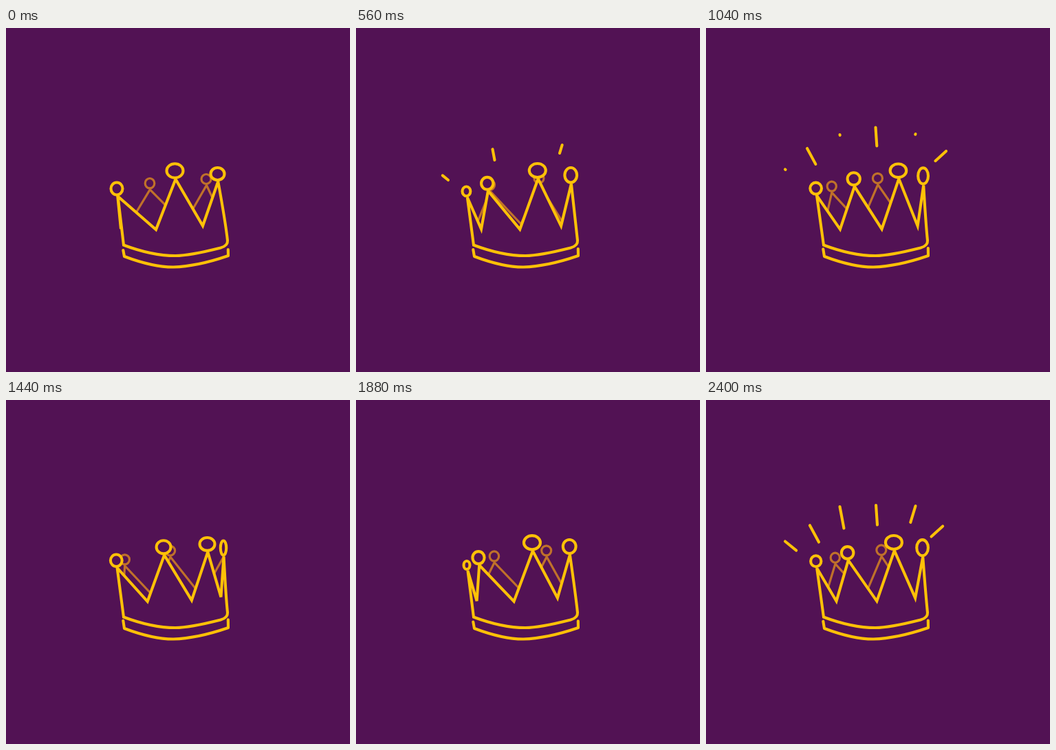
Write an HTML page with a canvas that moves like this. It is 500 by 500 pixels and loops after 2.44 s.

```html
<!DOCTYPE html>
<html lang="en">
<head>
<meta charset="utf-8">
<title>Crown</title>
<style>
html, body { margin: 0; width: 100%; height: 100%; overflow: hidden; background: #521254; }
canvas { display: block; width: 100%; height: 100%; }
</style>
</head>
<body>
<canvas id="stage" width="500" height="500"></canvas>
<script>
const ctx = document.getElementById('stage').getContext('2d');
const BG = '#521254', GOLD = '#ffc107', BRONZE = '#c0712a';
const LOOP = 2440, CUT = 1560, TURN = 1900, STEP = 40;

// Six balls share one closed path round the crown: place, x, y, rx, ry.
// Places 0 to 4 are the front, 4 to 6 the rear.
const ballPath = [
  [0, 161, 236, .5, 6], [.17, 161, 240, 4.5, 6], [.5, 159.5, 233, 8.3, 8.4], [1, 161, 233.5, 8.5, 9],
  [1.5, 211.5, 220.5, 8.8, 8.9], [2, 245.5, 207.5, 12, 10.2], [2.5, 276.5, 206.8, 12, 9.9],
  [3, 307.5, 212, 10, 9], [3.5, 315.5, 215, 8.1, 11.9], [3.76, 316, 215, 4.2, 10.5],
  [4, 291, 219.5, 7, 7], [4.4, 257, 218, 7, 7.2], [4.76, 238.5, 219, 7, 7],
  [5, 209, 225.7, 6.8, 7.2], [5.5, 185, 229.7, 6.6, 7], [6, 161, 234, 7, 7]
];

// The valleys between them follow their own path: place, x, y
const valleyPath = [
  [0, 167, 292], [1, 218, 293], [1.7, 266, 292], [2, 286, 287.5], [2.5, 306.5, 288],
  [3, 318, 285], [3.5, 291, 285], [3.76, 284, 285], [4, 259, 285], [4.4, 233, 285],
  [4.76, 214, 285], [5, 179, 285], [6, 167, 285]
];

// Inner and outer ends of the rays
const rays = [
  [134, 221, 115, 205.5], [164, 206.5, 147, 175], [201.5, 192, 194.5, 155],
  [249, 181.5, 246.5, 144.5], [296, 182, 304.5, 154], [327.5, 198.5, 349, 179]
];

const mix = (a, b, k) => a + (b - a) * k;
const clamp = v => Math.min(1, Math.max(0, v));

function along(path, place) {
  const i = path.findIndex(key => key[0] > place);
  const a = path[i - 1], b = path[i];
  const k = (place - a[0]) / (b[0] - a[0]);
  return a.slice(1).map((v, j) => mix(v, b[j + 1], k));
}

const valley = place => along(valleyPath, place);

function tip(place) {
  const [x, y, , ry] = along(ballPath, place);
  return [x + 1.5 - place / 4, y + ry + 2];
}

function pen(color, width) {
  ctx.strokeStyle = color;
  ctx.lineWidth = width;
  ctx.lineCap = 'round';
  ctx.lineJoin = 'miter';
  ctx.miterLimit = 5;
}

function line(points) {
  ctx.beginPath();
  points.forEach(p => ctx.lineTo(...p));
  ctx.stroke();
}

function ball(place) {
  ctx.beginPath();
  ctx.ellipse(...along(ballPath, place), 0, 0, Math.PI * 2);
  ctx.fill();
  ctx.stroke();
}

function drawRear(u) {
  pen(BRONZE, 3.2);
  const zigzag = [valley(3 + u), tip(4 + u), valley(4 + u), tip(5 + u), valley(5 + u)];
  // The right front point joins in as it turns away
  if (u > .6) zigzag.unshift(tip(3 + u));
  line(zigzag);
  ball(5 + u);
  ball(4 + u);
}

function drawFront(u) {
  pen(GOLD, 4.1);
  ctx.beginPath();
  ctx.moveTo(171, 315.5);
  for (let i = 0; i < 4; i++) {
    ctx.lineTo(...tip(i + u));
    if (i < 3) ctx.lineTo(...valley(i + u));
  }
  ctx.quadraticCurveTo(319.5, 285, 322, 309);
  ctx.quadraticCurveTo(322.5, 316.5, 312, 319.5);
  ctx.quadraticCurveTo(267, 331, 246, 331);
  ctx.quadraticCurveTo(212, 331, 171, 315.5);
  ctx.closePath();
  ctx.fill();
  ctx.stroke();
  for (let i = 0; i < 4; i++) ball(i + u);
}

function drawBand(u) {
  pen(GOLD, 4.1);
  ctx.lineJoin = 'round';
  ctx.beginPath();
  ctx.moveTo(170.3, 323 - 3 * u);
  ctx.lineTo(172, 332);
  ctx.quadraticCurveTo(213, 347.5, 243, 347.5);
  ctx.quadraticCurveTo(278, 346.5, 323, 331);
  ctx.lineTo(322.8, 322 - 3.5 * u);
  ctx.stroke();
}

function drawRays(t) {
  pen(GOLD, 4.1);
  rays.forEach(([x0, y0, x1, y1], i) => {
    const s = t - i % 2 * 160;
    if (s < 410 || s > 1050) return;
    const head = clamp((s - 410) / 350);
    const tail = clamp((s - 760) / 285) ** 1.5;
    line([tail, Math.max(head, tail + .01)].map(k => [mix(x0, x1, k), mix(y0, y1, k)]));
  });
}

function draw(ms) {
  const t = Math.floor(ms % LOOP / STEP) * STEP % CUT;
  const u = t / TURN;
  ctx.fillStyle = BG;
  ctx.fillRect(0, 0, 500, 500);
  drawRear(u);
  drawFront(u);
  drawBand(u);
  drawRays(t);
}

let start;
function tick(now) {
  start ??= now;
  draw(now - start);
  requestAnimationFrame(tick);
}
draw(0);
requestAnimationFrame(tick);
</script>
</body>
</html>
```
